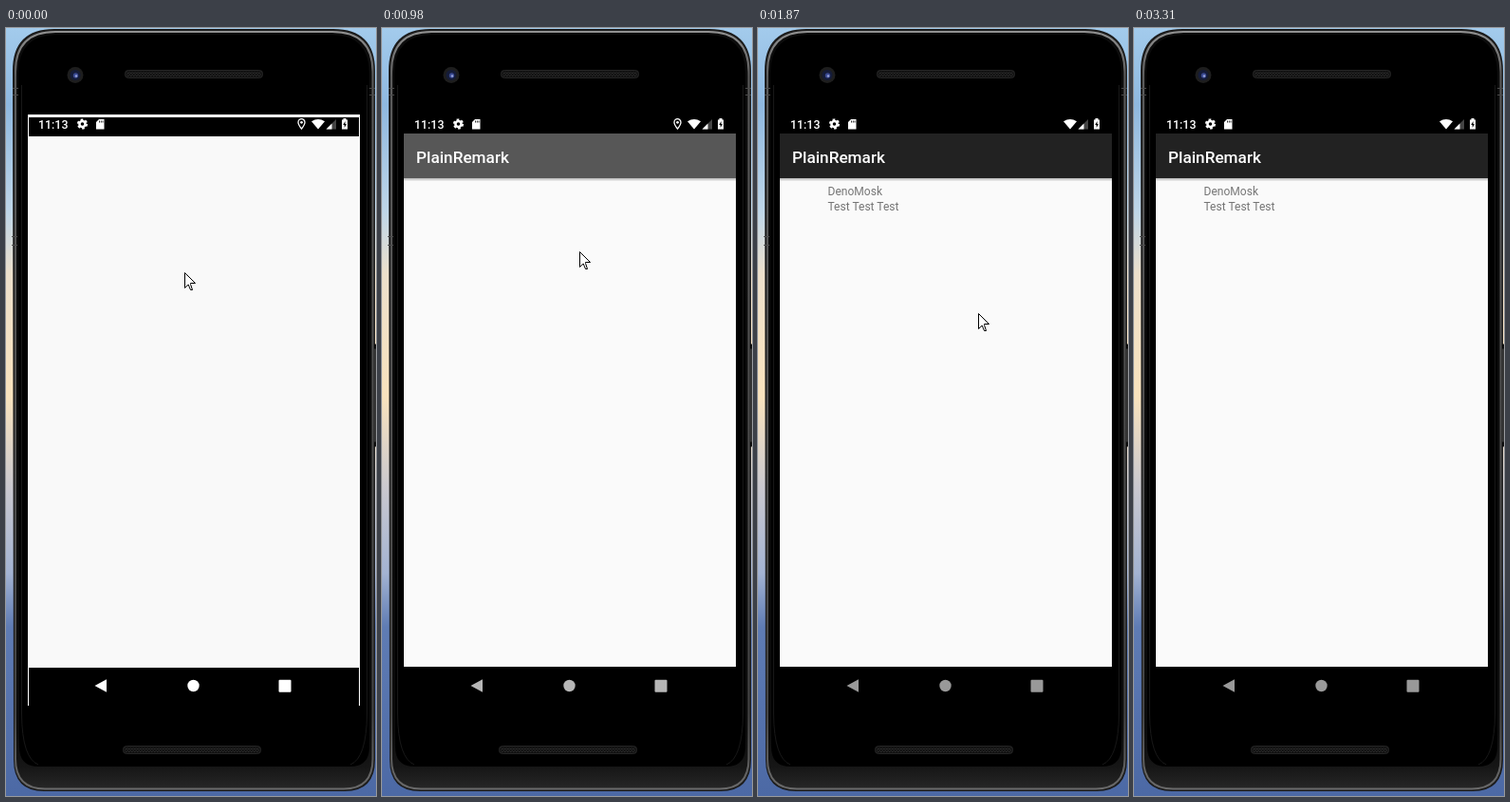
Write an HTML page that moves like this. It is 390 px wide and 808 px high and loops after 3960 ms.

```html
<!DOCTYPE html>
<html lang="en">
<head>
<meta charset="utf-8">
<title>Phone app launch and refresh</title>
<style>
  html, body { margin: 0; width: 100%; height: 100%; overflow: hidden; background: #000; }
  svg { display: block; width: 100%; height: 100%; }
  text { font-family: Roboto, sans-serif; }
  .medium { font-weight: 500; fill: #fff; }
</style>
</head>
<body>
<svg viewBox="0 0 390 808">
  <defs>
    <linearGradient id="sky" x2="0" y2="1">
      <stop offset="0" stop-color="#a3cbec"/>
      <stop offset=".1" stop-color="#8fb8df"/>
      <stop offset=".24" stop-color="#bfd6e8"/>
      <stop offset=".32" stop-color="#ecdfcb"/>
      <stop offset=".48" stop-color="#f8e2bd"/>
      <stop offset=".6" stop-color="#c9c8cf"/>
      <stop offset=".71" stop-color="#a3b3d2"/>
      <stop offset=".78" stop-color="#5f7cb4"/>
      <stop offset="1" stop-color="#4c69a5"/>
    </linearGradient>
    <linearGradient id="rim" x2="0" y2="1">
      <stop offset="0" stop-color="#909090"/>
      <stop offset=".06" stop-color="#5a5a5a"/>
      <stop offset=".9" stop-color="#444"/>
      <stop offset="1" stop-color="#6a6a6a"/>
    </linearGradient>
    <linearGradient id="chin" gradientUnits="userSpaceOnUse" x1="0" y1="740" x2="0" y2="802">
      <stop offset="0" stop-color="#0c0c0c"/>
      <stop offset=".6" stop-color="#161616"/>
      <stop offset="1" stop-color="#282828"/>
    </linearGradient>
    <linearGradient id="barShadow" x2="0" y2="1">
      <stop offset="0" stop-opacity=".28"/>
      <stop offset="1" stop-opacity="0"/>
    </linearGradient>
    <pattern id="mesh" width="3" height="3" patternUnits="userSpaceOnUse">
      <path d="M0 .5h1.5M1.5 2h1.5" stroke="#2d2d2d"/>
    </pattern>
    <filter id="soft" x="-50%" y="-50%" width="200%" height="200%">
      <feDropShadow dx="0" dy="1" stdDeviation="1.3" flood-opacity=".3"/>
    </filter>
    <g id="speaker">
      <rect width="146" height="9" rx="4" fill="#111"/>
      <rect x="2" y="2" width="142" height="5" rx="2" fill="url(#mesh)"/>
      <rect x=".5" y=".5" width="145" height="8" rx="4" fill="none" stroke="#262626"/>
    </g>
  </defs>

  <!-- Wallpaper and phone body -->
  <rect width="390" height="808" fill="url(#sky)"/>
  <path d="M7 45Q7 1 51 1H345Q389 1 389 45V770Q389 803 357 803H40Q8 803 8 770Z" fill="#1c1c1c"/>
  <path d="M10 46Q10 4 52 4H344Q386.500 4 386.500 46V769Q386.500 800.500 356 800.500H41Q10 800.500 10 769Z"
        fill="url(#chin)" stroke="url(#rim)" stroke-width="2"/>
  <path d="M13 48Q13 7 54 7H342Q383 7 383 48V756Q383 777 363 777H34Q14 777 14 756Z"/>
  <path d="M16.500 60V722Q17 768 34 775M380.500 60V722Q380 768 363 775" fill="none" stroke="#181818"/>
  <path d="M7 63.500h6M7 70.500h6M383 63.500h6M383 70.500h6M6 219.500h6M6 228.500h6" stroke="#4a4a4a"/>
  <path d="M389 333v107" stroke="#333" stroke-width="2"/>
  <path d="M388 335h2M388 438h2" stroke="#0a0a0a" stroke-width="5"/>
  <circle cx="73" cy="49.500" r="8.500" fill="#1e1e1e"/>
  <circle cx="73" cy="49.500" r="5.500" fill="#151c38"/>
  <circle cx="73.500" cy="50" r="2.700" fill="#3a4a92"/>
  <circle cx="74" cy="50.500" r="1.200" fill="#9aa6dc"/>
  <use href="#speaker" x="125" y="44"/>
  <use href="#speaker" x="123" y="755"/>

  <!-- Screen -->
  <rect x="23" y="111" width="350" height="561" fill="#fafafa"/>
  <g id="opening">
    <path d="M23 91H373V713H23Z" fill="#fff"/>
    <path d="M24 94H372V713H24Z"/>
    <path d="M23 114H372V673H23Z" fill="#f9f9f9"/>
  </g>

  <!-- Status bar -->
  <text class="medium" x="34" y="105.500" font-size="12.400">11:13</text>
  <circle cx="80.500" cy="101" r="4.300" fill="#fff"/>
  <circle cx="80.500" cy="101" r="4.700" fill="none" stroke="#fff" stroke-width="1.800" stroke-dasharray="2.700 2.222"/>
  <circle cx="80.500" cy="101" r="1.800"/>
  <path d="M98 96h5.500v10.500H95V99Z" fill="#fff"/>
  <path d="M98.500 97.500v2M100.300 97.500v2M102 97.500v2" stroke="#000" stroke-width=".8"/>
  <g id="pin">
    <path d="M311.500 106Q308 101.500 308 99.200a3.500 3.500 0 0 1 7 0Q315 101.500 311.500 106Z"
          fill="none" stroke="#fff" stroke-width="1.300"/>
    <circle cx="311.500" cy="99.300" r="1.400" fill="#fff"/>
  </g>
  <path d="M322 98.300Q329 93.500 336 98.300L329 106.500Z" fill="#fff"/>
  <path d="M337.500 106.500L348 96V106.500Z" fill="#444"/>
  <path d="M337.500 106.500L343.500 100.500V106.500Z" fill="#fff"/>
  <path d="M354 96.500h1.500V95h3v1.500H360V106.500H354Z" fill="#fff"/>
  <path d="M357.500 98L355.300 102h1.400v3l2.200-4h-1.400Z"/>

  <!-- App -->
  <g id="app">
    <rect x="23" y="158" width="350" height="3.500" fill="url(#barShadow)"/>
    <rect id="bar" x="23" y="111" width="350" height="47"/>
    <text class="medium" x="36" y="141.500" font-size="17.200">PlainRemark</text>
  </g>
  <g id="post" font-size="12.050" fill="#757575">
    <text x="73.500" y="176">DenoMosk</text>
    <text x="73.500" y="192.300">Test Test Test</text>
  </g>
  <g id="spinner">
    <circle r="17" fill="#fafafa" filter="url(#soft)"/>
    <circle id="arc" r="8" fill="none" stroke="#10d5f5" stroke-width="2" pathLength="360"/>
  </g>

  <!-- Navigation -->
  <g id="nav">
    <path d="M93.500 692L106 685.300V698.700Z"/>
    <circle cx="197.500" cy="692" r="6.200"/>
    <rect x="287.500" y="685.700" width="13" height="13" rx="1"/>
  </g>

  <path id="cursor" d="M.5 .5V16.500L4.200 13L6.500 18.500H8.500L6.500 12.500V11.500H11.500Z" fill="#fff" stroke="#000"/>
</svg>

<script>
const LOOP = 3960;
const byId = id => document.getElementById(id);
const [opening, pin, app, bar, post, spinner, arc, nav, cursor] =
  ["opening", "pin", "app", "bar", "post", "spinner", "arc", "nav", "cursor"].map(byId);

const ticks = [0, 130, 430, 590, 830, 980, 1100, 1220, 1360, 1480, 1750, 1870, 1990,
  2140, 2290, 2410, 2530, 2680, 2800, 2920, 3070, 3190, 3310];

// [time, x, y] of the pointer, held until the next entry
const pointerPath = [
  [0, 188, 257], [430, 213, 266], [590, 212, 270], [830, 208, 235],
  [1360, 199, 297], [1480, 200, 307], [1750, 222, 196], [1870, 232, 300],
  [1990, 244, 442], [2140, 247, 678], [2290, 242, 697], [2800, 247, 689],
  [2920, 255, 676], [3070, 276, 728], [3190, 303, 787]
];

const clamp01 = v => Math.min(1, Math.max(0, v));
const lastAt = (list, t, time = item => item) => list.filter(item => time(item) <= t).pop();
const show = (el, visible) => el.setAttribute("visibility", visible ? "visible" : "hidden");
const grey = level => `rgb(${level},${level},${level})`;

function render(now) {
  const t = lastAt(ticks, now % LOOP);

  show(opening, t < 130);
  show(pin, t < 1220);
  show(app, t >= 980);
  show(post, t >= 1360);
  bar.setAttribute("fill", t < 1100 ? "#575757" : t < 1220 ? "#353535" : "#222");
  nav.setAttribute("fill", grey(Math.round(255 - 102 * clamp01((t - 370) / 850))));

  show(spinner, t >= 2140 && t < 2920);
  const scale = t < 2800 ? 1 : 0.45;
  spinner.setAttribute("transform", `translate(197.5 ${t < 2290 ? 253 : 198}) scale(${scale})`);
  const turn = (t - 2290) * 0.3;
  const sweep = 265 - Math.max(0, turn) * 0.8;
  arc.setAttribute("transform", `rotate(${turn * 1.8 - 115})`);
  arc.setAttribute("stroke-dasharray", `${sweep} ${360 - sweep}`);

  show(cursor, t < 3310);
  const [, x, y] = lastAt(pointerPath, t, item => item[0]);
  cursor.setAttribute("transform", `translate(${x} ${y})`);
}

const start = performance.now();
function loop() {
  render(performance.now() - start);
  requestAnimationFrame(loop);
}
loop();
</script>
</body>
</html>
```
